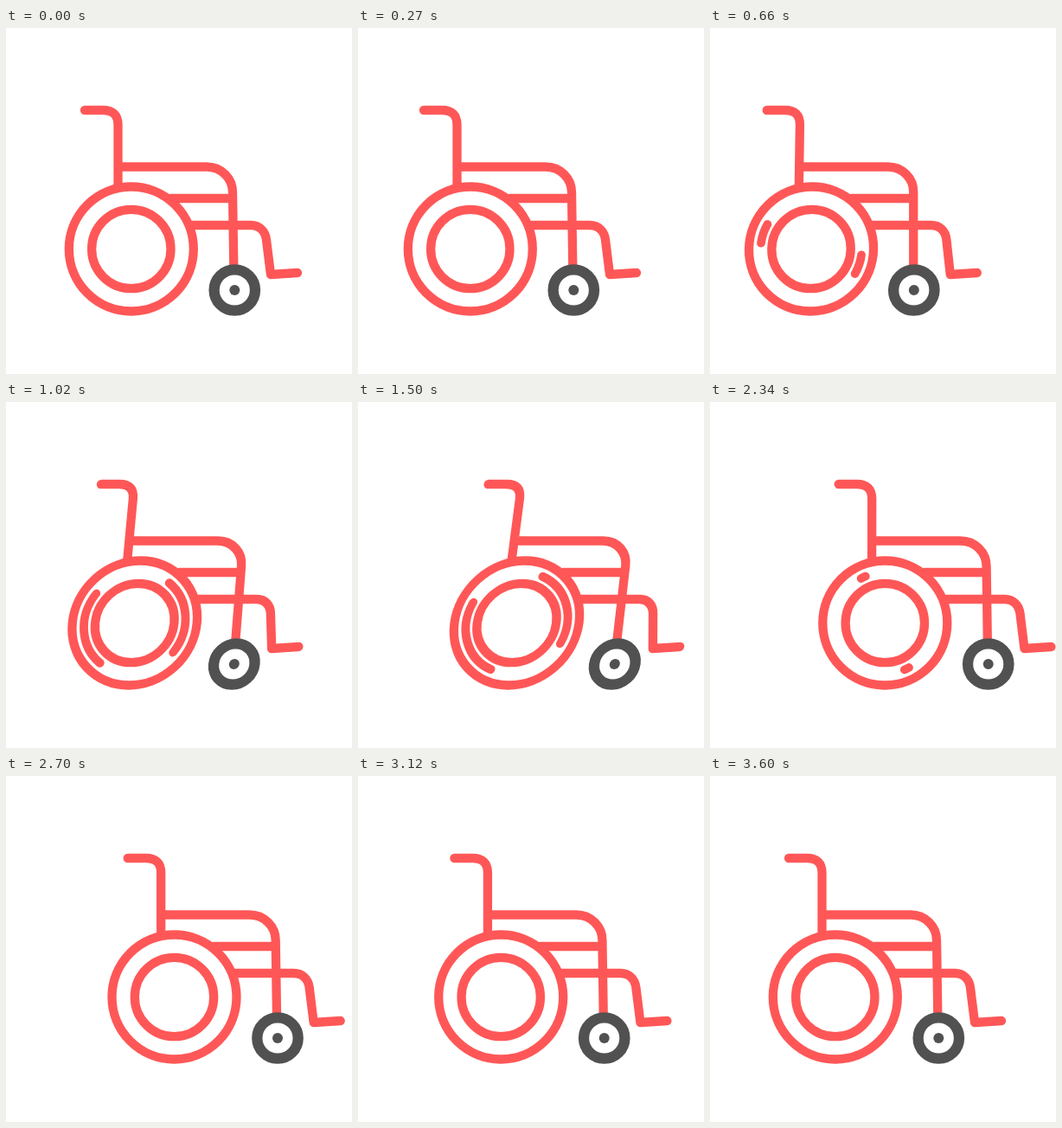
An HTML page with a canvas that plays this animation: 400 by 400 pixels, repeating every 3.63 s.

```html
<!DOCTYPE html>
<html lang="en">
<head>
<meta charset="utf-8">
<title>Rolling wheelchair</title>
<style>
  html, body { margin: 0; width: 100%; height: 100%; overflow: hidden; background: #fff; }
  canvas { display: block; width: 400px; height: 400px; }
</style>
</head>
<body>
<canvas id="stage" width="400" height="400"></canvas>
<script>
const ctx = document.getElementById('stage').getContext('2d');
const RED = '#ff5757', GREY = '#515151';
const STEP = 30, STEPS = 121, AXLE_Y = 303;

// Keys are [step, value], joined by a smooth curve that never overshoots them.
const roll = curve([[0, 0], [18, -30], [22, -28.5], [34, -0.5], [36, 5.6], [50, 32.5],
  [54, 38], [66, 51], [72, 55.2], [77, 57.5], [90, 49.7], [108, 13], [120, 0]]);
const lean = curve([[16, 0], [45, 0.138], [80, 0]]);
const spin = curve([[18, 185], [22, 198], [34, 351.5], [50, 518.5], [66, 587], [80, 605]]);
const sweep = curve([[19, 0], [22, 22.5], [34, 88], [42, 94], [50, 91], [66, 65], [81, 0]]);

function curve(keys) {
  const last = keys.length - 1;
  const rise = i => (keys[i + 1][1] - keys[i][1]) / (keys[i + 1][0] - keys[i][0]);
  const slope = i => {
    if (i === 0 || i === last) return 0;
    const a = rise(i - 1), b = rise(i);
    return a * b > 0 ? 2 * a * b / (a + b) : 0;
  };
  return n => {
    if (n <= keys[0][0]) return keys[0][1];
    if (n >= keys[last][0]) return keys[last][1];
    const i = keys.findIndex(key => key[0] > n) - 1;
    const [x0, y0] = keys[i], [x1, y1] = keys[i + 1];
    const h = x1 - x0, u = (n - x0) / h, v = 1 - u;
    return y0 * v * v * (1 + 2 * u) + y1 * u * u * (3 - 2 * u)
      + h * u * v * (slope(i) * v - slope(i + 1) * u);
  };
}

function ring(x, y, radius, width, color, from = 0, to = 360) {
  ctx.beginPath();
  ctx.arc(x, y, radius, from * Math.PI / 180, to * Math.PI / 180);
  ctx.lineWidth = width;
  ctx.strokeStyle = color;
  ctx.stroke();
}

const chair = new Path2D(
  'M91 95H112Q129.5 95 129.5 112V183' +
  'M129.5 160.5H232C249 160.5 262 174 262 190L263.3 275' +
  'M190 197H262' +
  'M213 228H283C293 228 300 235 301 245L306 285L337 283');

function draw(n) {
  ctx.setTransform(1, 0, 0, 1, 0, 0);
  ctx.fillStyle = '#fff';
  ctx.fillRect(0, 0, 400, 400);

  // Shear about the height of the front axle.
  const k = lean(n);
  ctx.setTransform(1, 0, -k, 1, roll(n) + k * AXLE_Y, 0);
  ctx.lineCap = ctx.lineJoin = 'round';
  ctx.strokeStyle = RED;
  ctx.lineWidth = 10.3;
  ctx.stroke(chair);

  ring(144.8, 255.5, 72, 10.3, RED);
  ring(144.8, 255.5, 45.7, 10.3, RED);
  const half = sweep(n) / 2, middle = spin(n);
  if (half > 0) {
    for (const side of [0, 180]) {
      ring(144.8, 255.5, 58.5, 9.8, RED, middle + side - half, middle + side + half);
    }
  }

  ctx.fillStyle = '#fff';
  ctx.beginPath();
  ctx.arc(264.3, AXLE_Y, 24, 0, Math.PI * 2);
  ctx.fill();
  ring(264.3, AXLE_Y, 23.7, 12.3, GREY);
  ctx.fillStyle = GREY;
  ctx.beginPath();
  ctx.arc(264.3, AXLE_Y, 6, 0, Math.PI * 2);
  ctx.fill();
}

const start = performance.now();
function tick() {
  const elapsed = Math.max(0, performance.now() - start);
  draw(Math.floor(elapsed / STEP) % STEPS);
  requestAnimationFrame(tick);
}
tick();
</script>
</body>
</html>
```
